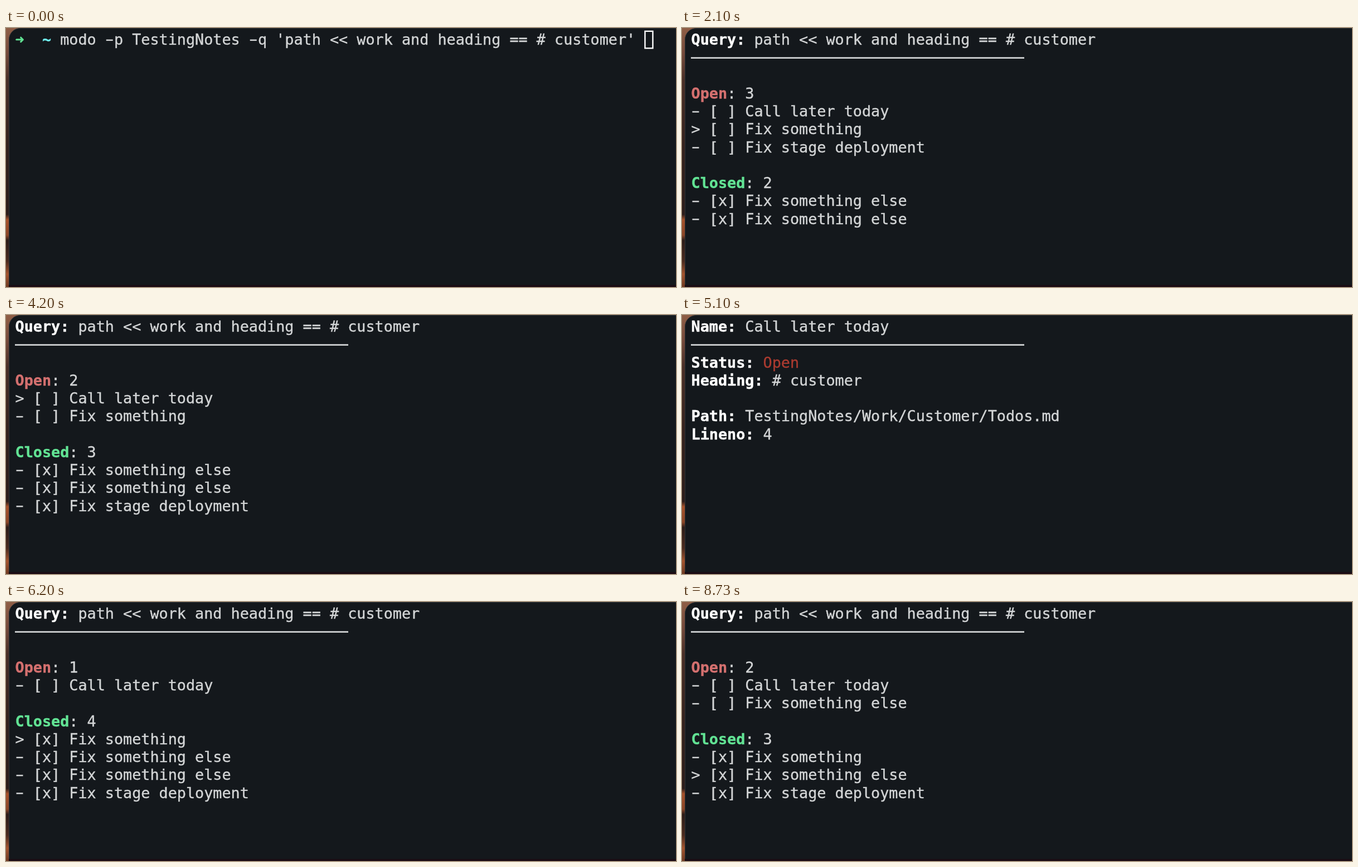
An HTML page with a canvas for the animation above (8860 ms loop, 1202 px wide and 466 px high).

```html
<!DOCTYPE html>
<html lang="en">
<head>
<meta charset="utf-8">
<title>Task list in a terminal</title>
<style>
  html, body { margin: 0; width: 100%; height: 100%; overflow: hidden; background: #14181c; }
  canvas { display: block; }
</style>
</head>
<body>
<canvas id="stage" width="1202" height="466"></canvas>
<script>
const ctx = document.getElementById('stage').getContext('2d');
const LOOP = 8860, COL = 16.125, ROW = 32.25, LEFT = 16.5, BASE = 30.2;
const FONT = '26.8px "DejaVu Sans Mono", monospace';
const TEXT = '#d3d5d6', WHITE = '#ffffff', RED = '#d4706f', GREEN = '#62e394';
const QUERY = 'path << work and heading == # customer';

// Task lists as [open, closed]
const CALL = 'Call later today', FIX = 'Fix something', ELSE = 'Fix something else',
      STAGE = 'Fix stage deployment';
const START = [[CALL, FIX, STAGE], [ELSE, ELSE]];
const STAGED = [[CALL, FIX], [ELSE, ELSE, STAGE]];
const FIXED = [[CALL], [FIX, ELSE, ELSE, STAGE]];
const REOPENED = [[CALL, ELSE], [FIX, ELSE, STAGE]];

// Each step: start time, screen, then for lists the tasks and selected index
const steps = [
  [0, prompt],
  [700, list, START, 0],
  [1800, list, START, 1],
  [2400, list, START, 2],
  [2700, list, STAGED, 2],
  [3100, list, STAGED, 3],
  [3200, list, STAGED, 4],
  [3400, list, STAGED, 3],
  [3500, list, STAGED, 2],
  [3700, list, STAGED, 1],
  [3800, list, STAGED, 0],
  [4400, detail],
  [5300, list, STAGED, 0],
  [5700, list, STAGED, 1],
  [6200, list, FIXED, 1],
  [7100, list, FIXED, 2],
  [7400, list, FIXED, 3],
  [7600, list, FIXED, 4],
  [7900, list, FIXED, 3],
  [8100, list, REOPENED, 3],
];

function put(text, col, row, color = TEXT, bold = false) {
  ctx.font = (bold ? 'bold ' : '') + FONT;
  ctx.fillStyle = ctx.strokeStyle = color;
  ctx.lineWidth = 0.4;
  [...text].forEach((ch, i) => {
    const x = LEFT + (col + i) * COL, y = BASE + row * ROW;
    if (ch === '-') return ctx.fillRect(x + 2, y - 9.6, 12, 2.5); // wide hyphen
    ctx.fillText(ch, x, y);
    ctx.strokeText(ch, x, y);
  });
}

function field(row, label, value, color = TEXT) {
  put(label + ':', 0, row, WHITE, true);
  put(value, label.length + 2, row, color);
}

function rule() {
  ctx.fillStyle = '#dcdedf';
  ctx.fillRect(16, 52.5, 598, 2.6);
}

function prompt() {
  put('➜', 0, 0, GREEN, true);
  put('~', 3, 0, '#70f0f0', true);
  put(`modo -p TestingNotes -q '${QUERY}'`, 5, 0);
  ctx.strokeStyle = WHITE;
  ctx.lineWidth = 2.4;
  ctx.strokeRect(1146.4, 5.8, 14, 30.6);
}

function list([open, closed], selected) {
  field(0, 'Query', QUERY);
  rule();
  let row = 3, index = 0;
  const group = (name, color, mark, tasks) => {
    put(name, 0, row, color, true);
    put(': ' + tasks.length, name.length, row++);
    for (const task of tasks)
      put(`${index++ === selected ? '>' : '-'} [${mark}] ${task}`, 0, row++);
    row++;
  };
  group('Open', RED, ' ', open);
  group('Closed', GREEN, 'x', closed);
}

function detail() {
  field(0, 'Name', CALL);
  rule();
  field(2, 'Status', 'Open', '#ab3b30');
  field(3, 'Heading', '# customer');
  field(5, 'Path', 'TestingNotes/Work/Customer/Todos.md');
  field(6, 'Lineno', '4');
}

// Desktop strip behind the rounded window
function backdrop() {
  const desk = ctx.createLinearGradient(0, 0, 0, 466);
  [[0, '#8f5e46'], [.1, '#74493a'], [.2, '#4a2f27'], [.45, '#35221d'], [.72, '#2c1d1a'],
   [.74, '#a5512a'], [.8, '#8a4526'], [.82, '#2c1c18'], [.9, '#4a2a1e'], [.95, '#a2532d'],
   [1, '#6e3a22']].forEach(([at, color]) => desk.addColorStop(at, color));
  ctx.fillStyle = desk;
  ctx.fillRect(0, 0, 1202, 466);
  ctx.fillStyle = '#1b0b13';
  ctx.fillRect(5, 460, 1197, 6);
  ctx.beginPath();
  ctx.roundRect(5.5, 0.5, 1230, 462, [20, 0, 0, 0]);
  ctx.fillStyle = '#14181c';
  ctx.fill();
  ctx.strokeStyle = '#303438';
  ctx.lineWidth = 1;
  ctx.beginPath();
  ctx.moveTo(5.5, 462);
  ctx.lineTo(5.5, 20.5);
  ctx.arcTo(5.5, 0.5, 25.5, 0.5, 20);
  ctx.lineTo(1202, 0.5);
  ctx.stroke();
}

function frame() {
  const t = performance.now() % LOOP;
  const [, draw, ...args] = steps.findLast(step => step[0] <= t);
  backdrop();
  draw(...args);
  requestAnimationFrame(frame);
}
frame();
</script>
</body>
</html>
```
